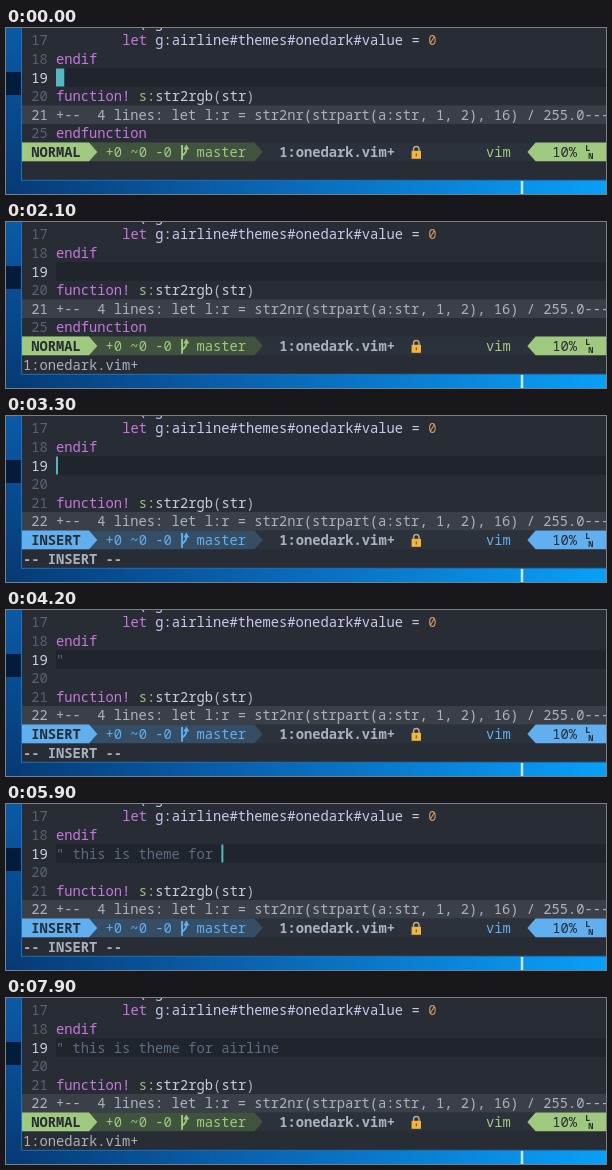
These frames come from a looping animation (600 by 166 pixels, 8 s). An HTML page:

```html
<!DOCTYPE html>
<html lang="en">
<head>
<meta charset="utf-8">
<title>Editing a theme in Vim</title>
<style>
html, body { margin: 0; width: 100%; height: 100%; overflow: hidden; background: #07417f; }
svg { display: block; width: 600px; height: 166px; }
text { font: 500 13.78px "Noto Sans Mono", "DejaVu Sans Mono", monospace; white-space: pre; }
.b { font-weight: 700; }
.tiny { font-size: 8.5px; font-weight: 700; }
</style>
</head>
<body>
<svg viewBox="0 0 600 166">
  <defs>
    <linearGradient id="side" x2="0" y2="1">
      <stop offset="0" stop-color="#0b5aa6"/>
      <stop offset="1" stop-color="#063a74"/>
    </linearGradient>
    <linearGradient id="floor">
      <stop offset="0" stop-color="#063a74"/>
      <stop offset=".4" stop-color="#0a62b0"/>
      <stop offset="1" stop-color="#08a0f8"/>
    </linearGradient>
  </defs>
  <rect width="600" height="166" fill="url(#floor)"/>
  <rect width="16" height="166" fill="url(#side)"/>
  <rect y="44" width="16" height="23" fill="#041c3c"/>
  <path d="M516 152V166" stroke="#c4e8fb" stroke-width="2.5"/>
  <rect x="15.5" y="-1" width="590" height="153.3" fill="#282c34" stroke="#1a72bd"/>
  <g id="screen"></g>
</svg>
<script>
const LOOP = 8000, STEP = 100, COL = 8.27, ROW = 18.6, LEFT = 16.9, TOP = 3, CODE = 4;
const SHOW = 1700, UP = 2600, OPEN = 3200, INSERT = 3300, ESCAPE = 7000;
const C = {
  bg: '#282c34', status: '#2c323c', line: '#20242d', fold: '#3b4048', fg: '#c8cdda', name: '#cdc8ee',
  dim: '#abb2bf', num: '#5a6274', here: '#d0d4de', key: '#c678dd', scope: '#98c379', lit: '#d19a66',
  note: '#5f6b7f', cur: '#56b6c2'
};
const MODES = {
  NORMAL: { main: '#a0c980', soft: '#41533f', message: '1:onedark.vim+' },
  INSERT: { main: '#61afef', soft: '#364d66', message: '-- INSERT --' }
};
const FOLD = '+--  4 lines: let l:r = str2nr(strpart(a:str, 1, 2), 16) / 255.0---';

// Each burst is typed at an even pace from its first key to its last.
const BURSTS = [
  ['"', 3840, 3840], [' this', 4220, 4440], [' is ', 4620, 4900],
  ['theme for ', 5320, 5840], ['airline', 6220, 6540]
];
const COMMENT = BURSTS.map(b => b[0]).join('');
const STROKES = BURSTS.flatMap(([s, first, last]) =>
  [...s].map((_, i) => first + (last - first) * i / Math.max(1, s.length - 1)));
const KEYS = [-210, SHOW, UP, INSERT, ...STROKES, ESCAPE];

const screen = document.getElementById('screen');
const px = col => LEFT + col * COL;
const py = row => TOP + row * ROW;
const esc = s => s.replace(/&/g, '&amp;').replace(/</g, '&lt;');
const box = (x, y, w, h, fill) => `<rect x="${x}" y="${y}" width="${w}" height="${h}" fill="${fill}"/>`;
const text = (col, row, s, fill, cls = '') =>
  `<text class="${cls}" x="${px(col)}" y="${py(row) + 14.4}" fill="${fill}">${esc(s)}</text>`;
const band = (row, x, fill) => box(x, py(row), 600 - x, ROW, fill);

// The cursor is solid after a key press, then pulses.
function blink(t) {
  const hold = 310, period = 510;
  const age = t - KEYS.filter(k => k <= t).pop();
  const wave = Math.sin(2 * Math.PI * (hold - Math.max(age, hold - period / 4)) / period);
  return Math.min(1, Math.max(0, .5 + 1.6 * wave)).toFixed(2);
}

// Parts are [text, colour] pairs laid out cell by cell.
function code(row, number, parts, active) {
  let col = CODE, out = active ? band(row, px(CODE), C.line) : '';
  out += text(1, row, String(number), active ? C.here : C.num);
  for (const [s, fill] of parts) {
    if (s.trim()) out += text(col, row, s, fill);
    col += s.length;
  }
  return out;
}

function fold(row, number) {
  return band(row, 16, C.fold) + text(1, row, String(number), C.dim) + text(CODE, row, FOLD, C.dim);
}

function branch(x, y, fill) {
  return `<path d="M${x + 2} ${y + 2.5}v14.6m0 -4.1q4.3 -2 4.3 -7" fill="none" stroke="${fill}" stroke-width="1.9"/>` +
    `<path d="M${x + 3.3} ${y + 7}l3 -5l3 5Z" fill="${fill}"/>`;
}

function lock(x, y) {
  return `<path d="M${x + 2} ${y + 9}v-2.5a2.7 2.7 0 0 1 5.4 0v2.5" fill="none" stroke="#b9a98a" stroke-width="1.5"/>` +
    box(x, y + 8.2, 9.4, 8, '#f3b63d') + box(x + 4.1, y + 10.8, 1.3, 3, '#8a5d1d');
}

function status(mode) {
  const { main, soft } = MODES[mode], y = py(6);
  const arrow = (edge, base, tip, fill) =>
    `<path d="M${edge} ${y}H${px(base)}L${px(tip)} ${y + ROW / 2}L${px(base)} ${y + ROW}H${edge}Z" fill="${fill}"/>`;
  const tiny = (s, x, dy) => `<text class="tiny" x="${x}" y="${y + dy}" fill="${C.bg}">${s}</text>`;
  return band(6, 16, C.status) + arrow(16, 28, 29, soft) + arrow(16, 8, 9, main) + arrow(600, 62, 61, main) +
    text(1, 6, mode, C.bg, 'b') + text(10, 6, '+0 ~0 -0', main) + branch(px(19), y, main) +
    text(21, 6, 'master', main) + text(31, 6, '1:onedark.vim+', C.dim, 'b') + lock(px(47), y) +
    text(56, 6, 'vim', main) + text(64, 6, '10%', C.bg) +
    tiny('L', px(68), 8.5) + tiny('N', px(68) + 3, 16.5);
}

function cursor(col, row, bar, opacity, letter) {
  return `<g opacity="${opacity}">` +
    box(px(col), py(row) + .3, bar ? 2 : COL, ROW - .6, C.cur) +
    (letter ? text(col, row, letter, C.bg) : '') + '</g>';
}

function draw(t) {
  const added = t >= INSERT, bar = added && t < ESCAPE;
  const mode = bar ? 'INSERT' : 'NORMAL';
  const row = t >= UP && !added ? 1 : 2;
  const typed = STROKES.filter(k => k <= t).length;
  const func = [['function! ', C.key], ['s:', C.scope], ['str2rgb', C.fg], ['(', C.dim], ['str', C.fg], [')', C.dim]];

  let out = text(CODE, -1, 'if', C.key) + text(CODE + 3, -1, '!exists("g:airline', C.name);
  out += code(0, 17, [['        ', C.fg], ['let', C.key], [' g:airline#themes#onedark#value', C.name], [' = ', C.fg], ['0', C.lit]]);
  out += code(1, 18, [['endif', C.key]], row === 1);
  out += code(2, 19, [[COMMENT.slice(0, typed), C.note]], row === 2);
  out += added
    ? code(3, 20, []) + code(4, 21, func) + fold(5, 22)
    : code(3, 20, func) + fold(4, 21) + code(5, 25, [['endfunction', C.key]]);
  out += status(mode);
  if (t >= SHOW) out += text(0, 7, MODES[mode].message, C.dim, bar ? 'b' : '');

  // Hidden for a moment while the new line opens.
  if (t >= OPEN && !added) return out;
  const col = added && !bar ? typed - 1 : typed;
  const letter = bar ? '' : row === 1 ? 'e' : COMMENT.slice(0, typed)[col];
  return out + cursor(CODE + col, row, bar, blink(t), letter);
}

let shown = '';
function tick() {
  const t = Math.floor(performance.now() % LOOP / STEP) * STEP;
  const next = draw(t);
  if (next !== shown) screen.innerHTML = shown = next;
  requestAnimationFrame(tick);
}
tick();
</script>
</body>
</html>
```
